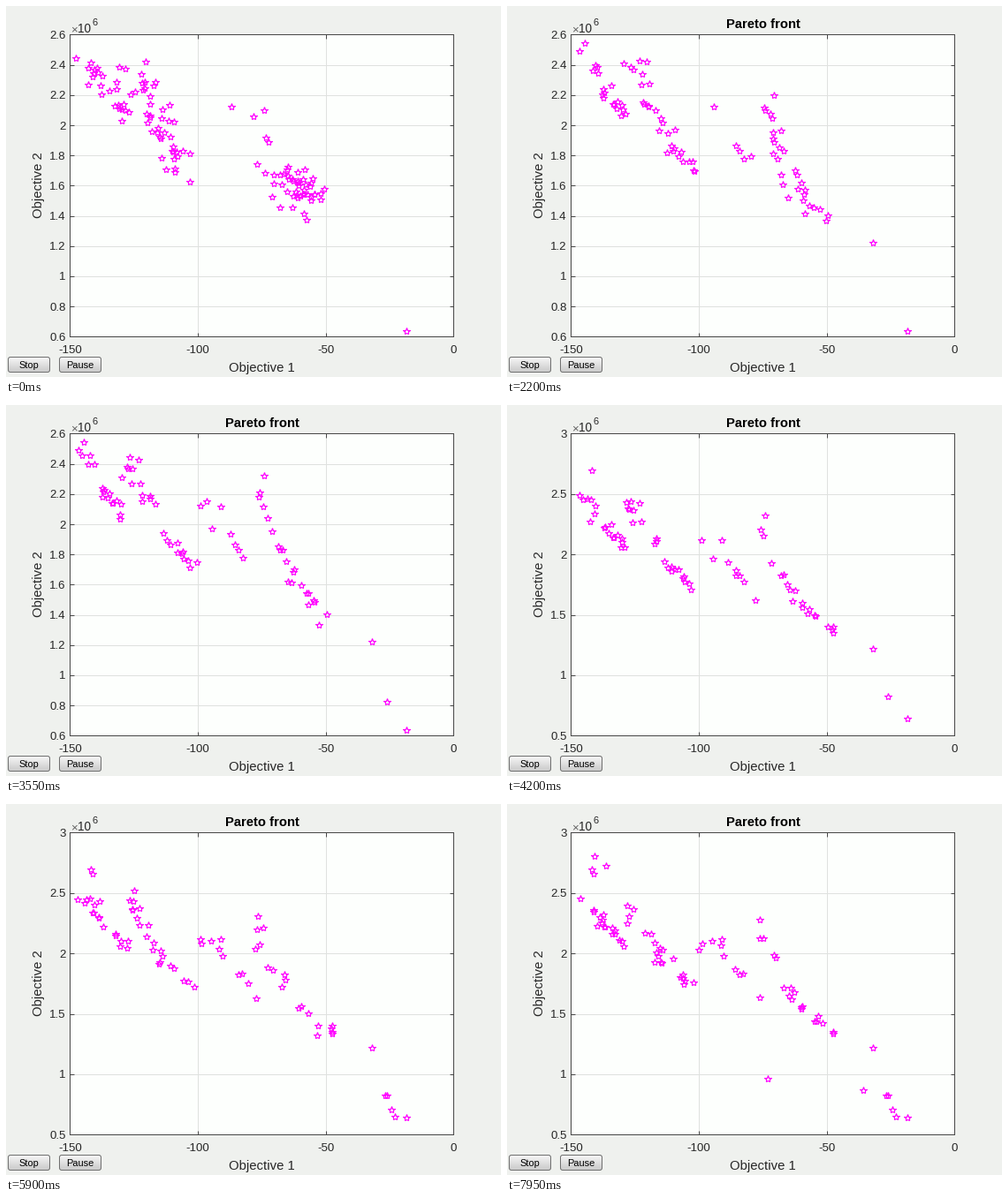
Animation of 560x420 px, one loop 8000 ms. Source, as a matplotlib script:

```python
import numpy as np
import matplotlib.pyplot as plt
from matplotlib.animation import FuncAnimation
from matplotlib.patches import FancyBboxPatch

W, H, DPI = 560, 420, 100
STEP, LOOP = 50, 8000
INK = "#262626"
plt.rcParams["font.family"] = "Liberation Sans"
plt.rcParams["axes.unicode_minus"] = False

# Lone solutions that stay once found: time, x, y / 1e6
LONERS = [
    (0, -18.3, .64), (150, -32.1, 1.22), (1000, -84, 1.828), (2900, -91.2, 2.115),
    (3450, -25.9, .822), (3900, -142, 2.693), (4350, -141, 2.656), (4800, -22.8, .646),
    (5700, -26.8, .822), (5850, -24.5, .705), (5950, -35.6, .865), (5950, -72.9, .961),
    (5950, -136.2, 2.722), (6100, -140.7, 2.803),
]

# Strands of the front: bend points at the start and once settled,
# number of solutions at the start and at the end
STRANDS = [
    ([(-144, 2.42), (-136, 2.25), (-127, 2.0)],
     [(-147, 2.47), (-138, 2.28), (-128, 2.05)], 22, 17),
    ([(-125, 2.38), (-117, 2.0), (-105, 1.68)],
     [(-128, 2.5), (-117, 1.9), (-100, 1.7)], 44, 21),
    ([(-69, 1.72), (-62, 1.55), (-53, 1.52)],
     [(-77, 2.32), (-69, 1.62), (-47, 1.36)], 46, 19),
    ([(-80, 2.1), (-75, 2.1), (-70, 2.07)],
     [(-102, 2.1), (-90, 2.1), (-76, 1.6)], 4, 8),
]


def pt(px):
    return px * 72 / DPI


def bend(points, u):
    a, b, c = np.array(points)
    return (1 - u) ** 2 * a + 2 * u * (1 - u) * b + u ** 2 * c


def offspring(rng, early, late, u, born):
    """A solution near its strand; the scatter shrinks as the front settles."""
    mix = min(born / 1800, 1)
    x, y = (1 - mix) * bend(early, u) + mix * bend(late, u)
    wide = (1 - .45 * mix) * (1.1 - .5 * u)
    x += rng.normal() * 3.4 * wide
    y += rng.normal() * .075 * wide
    return max(x, -147.6), min(y, 2.56)


def population():
    rows = [(t, LOOP, x, y) for t, x, y in LONERS]
    rng = np.random.default_rng(11)
    for early, late, n0, n1 in STRANDS:
        for slot in range(max(n0, n1)):
            # crowded strands close their last slots, thin ones open more
            opens = LOOP * .6 * max(slot - n0 + 1, 0) / max(n1 - n0, 1)
            closes = LOOP
            if slot >= n1:
                closes = 200 + 4200 * ((n0 - slot) / (n0 - n1)) ** 2
            born, turn = opens, 0
            while born < closes:
                life = 700 + rng.exponential(1300)
                if born == 0:
                    life = rng.uniform(50, 2400)
                u = (slot * .618 + turn * .37) % 1
                x, y = offspring(rng, early, late, u, born)
                rows.append((born, min(born + life, closes), x, y))
                born, turn = born + life, turn + 1
    return np.array(rows).T


BORN, GONE, X, Y = population()

fig = plt.figure(figsize=(W / DPI, H / DPI), dpi=DPI, facecolor="#eff1ee")
ax = fig.add_axes([72.4 / W, 45.6 / H, 434 / W, 342 / H], facecolor="#fdfffd")
ax.set_xlim(-150, 0)
ax.set_xticks([-150, -100, -50, 0])
ax.grid(color="#dfe1df", lw=pt(1))
ax.set_axisbelow(True)
ax.tick_params(direction="in", top=True, right=True, length=pt(4.5), width=pt(1),
               color="#484848", labelcolor=INK, labelsize=pt(13.3), pad=pt(4.5))
ax.tick_params(axis="x", pad=pt(10))
for spine in ax.spines.values():
    spine.set(color="#484848", linewidth=pt(1))
stars, = ax.plot([], [], "*", ms=pt(8.3), mfc="none", mec="#ff00ff",
                 mew=pt(1.2), clip_on=False)


def text(x, y, s, px, **kw):
    kw = {"ha": "center", "va": "center", "color": INK, **kw}
    return fig.text(x / W, 1 - y / H, s, fontsize=pt(px), **kw)


def button(x, label):
    y, w, h = H - 414.5, 47, 17
    pane = fig.add_axes([0, 0, 1, 1], facecolor="none")
    pane.axis("off")
    box = FancyBboxPatch((x, y), w, h, boxstyle="round,pad=0,rounding_size=2.5",
                         fc="none", ec="#707070", lw=pt(1))
    pane.add_patch(box)
    shade = np.linspace(.95, .81, 4).reshape(-1, 1)
    fill = pane.imshow(shade, cmap="gray", vmin=0, vmax=1, aspect="auto",
                       extent=(x, x + w, y, y + h), interpolation="bilinear")
    fill.set_clip_path(box)
    pane.set(xlim=(0, W), ylim=(0, H))
    text(x + w / 2, 407.5, label, 11, color="black")


title = text(289.5, 21, "Pareto front", 14.7, weight="bold", color="black")
text(289.5, 410, "Objective 1", 14.9)
text(37.5, 203, "Objective 2", 14.9, rotation=90)
text(73, 30, "×", 13.3, ha="left", va="baseline", color="#606060")
text(81.5, 30, "10", 13.6, ha="left", va="baseline")
text(97, 22.5, "6", 11, ha="left", va="baseline")
button(2.5, "Stop")
button(60.5, "Pause")


def draw(i):
    t = i * STEP
    live = (BORN <= t) & (t < GONE)
    stars.set_data(X[live], Y[live])
    if Y[live].max() > 2.6:
        low, high, gap = .5, 3, .5
    else:
        low, high, gap = .6, 2.6, .2
    ticks = np.arange(low, high + gap / 2, gap)
    ax.set_yticks(ticks, [f"{v:.3g}" for v in ticks])
    ax.set_ylim(low, high)
    title.set_visible(i > 0)
    return stars, title


anim = FuncAnimation(fig, draw, frames=LOOP // STEP, interval=STEP,
                     init_func=lambda: draw(0), repeat=True, repeat_delay=0)
plt.show()
```
